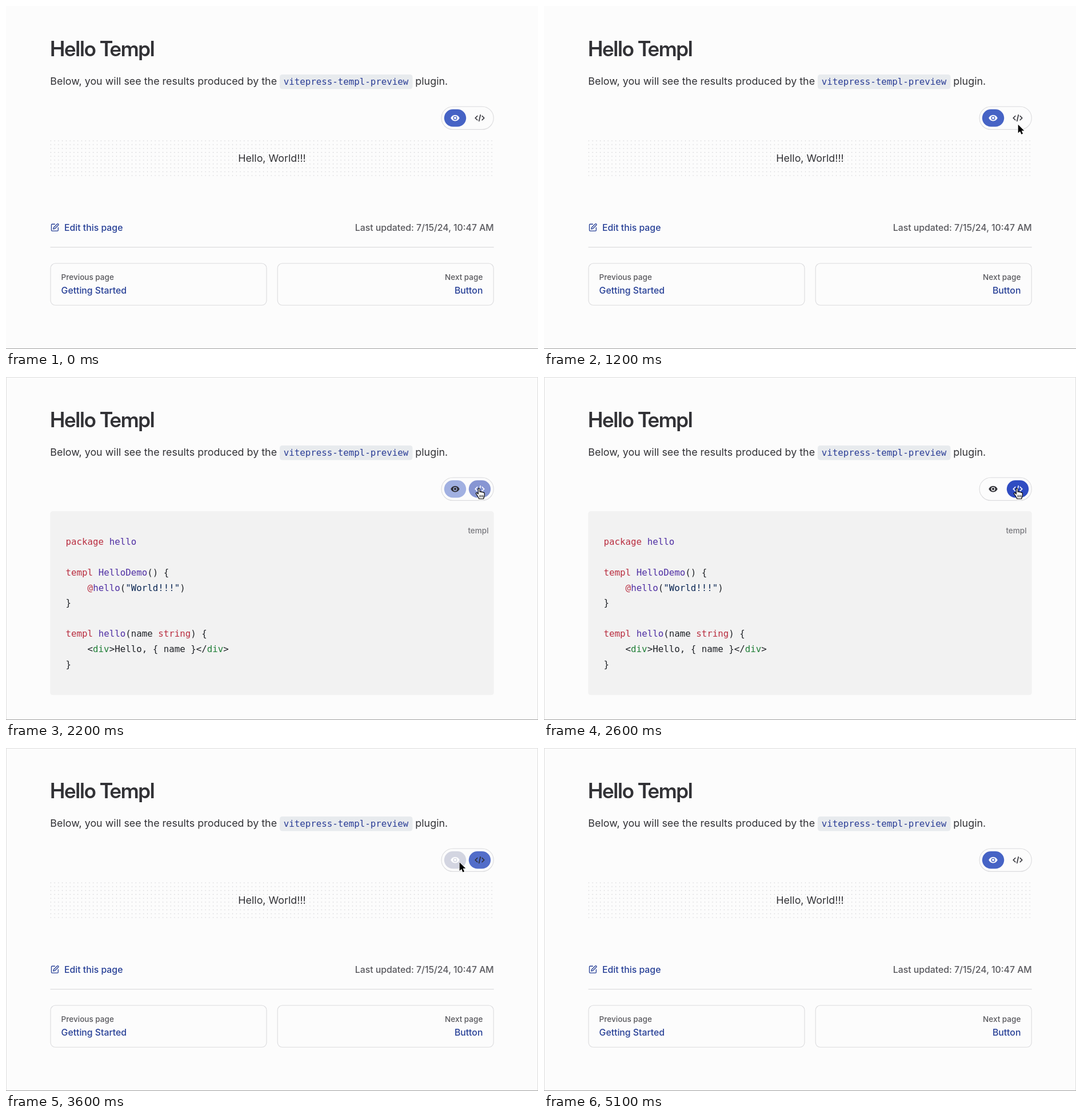
An HTML page for the animation above (5.2 s loop, 931x601 px).

```html
<!DOCTYPE html>
<html lang="en">
<head>
<meta charset="utf-8">
<title>Hello Templ</title>
<style>
  html, body { margin: 0; width: 100%; height: 100%; overflow: hidden; background: #fcfcfc; }
  svg { display: block; width: 931px; height: 601px; }
  text { font: 500 15.8px Inter, sans-serif; fill: #58585d; white-space: pre; }
  .title { font: 600 36.1px "Inter Display", Inter, sans-serif; letter-spacing: -.02em; fill: #323236; }
  .body { font-size: 17.9px; font-weight: 400; fill: #323236; }
  .small { font-size: 13.54px; }
  .link { fill: #263f96; }
  .mono { font: 15.79px "DejaVu Sans Mono", monospace; fill: #202328; }
  .mono.link { fill: #2a3d96; }
  .end { text-anchor: end; }
  .key { fill: #b92e40; }
  .fn { fill: #4f2fa3; }
  .str { fill: #0a2653; }
  .tag { fill: #217f38; }
  .outline { fill: none; stroke: #dcdcde; stroke-width: 1.13; }
</style>
</head>
<body>
<svg viewBox="0 0 931 601">
  <defs>
    <pattern id="dots" x="74.9" y="232.8" width="6.77" height="6.77" patternUnits="userSpaceOnUse">
      <circle cx="3.4" cy="3.4" r=".7" fill="#c6c6ca"/>
    </pattern>
  </defs>
  <rect width="931" height="601" fill="#fcfcfc"/>

  <text class="title" x="77.3" y="87.8">Hello Templ</text>
  <text class="body" x="77.3" y="138.3">Below, you will see the results produced by the</text>
  <rect x="479" y="120" width="232.5" height="25.5" rx="4.5" fill="#e8ebee"/>
  <text class="mono link" x="485.8" y="138">vitepress-templ-preview</text>
  <text class="body" x="716.3" y="138.3">plugin.</text>

  <rect class="outline" x="762" y="176.2" width="91.3" height="40.2" rx="20.1"/>
  <rect id="eyeButton" x="766.8" y="181" width="38.4" height="30.5" rx="15.25"/>
  <rect id="codeButton" x="809.8" y="181" width="38.4" height="30.5" rx="15.25"/>
  <path id="eyeIcon" transform="translate(777.6 187.8) scale(.7)" d="M12 4.5C7 4.5 2.73 7.61 1 12c1.73 4.39 6 7.5 11 7.5s9.27-3.11 11-7.5c-1.73-4.39-6-7.5-11-7.5zM12 17a5 5 0 1 1 0-10 5 5 0 0 1 0 10zm0-8a3 3 0 1 0 0 6 3 3 0 0 0 0-6z"/>
  <path id="codeIcon" d="M825.3 192.2l-4 4 4 4M832.7 192.2l4 4-4 4M830.4 190.2l-2.8 12" fill="none" stroke-width="1.6"/>

  <g id="preview">
    <rect x="77" y="234.5" width="776.5" height="63.5" fill="url(#dots)"/>
    <text class="body" x="465.5" y="272.8" text-anchor="middle">Hello, World!!!</text>
    <g transform="translate(77.5 380.3) scale(.658)" fill="none" stroke="#263f96" stroke-width="2" stroke-linecap="round" stroke-linejoin="round">
      <path d="M12 3H5a2 2 0 0 0-2 2v14a2 2 0 0 0 2 2h14a2 2 0 0 0 2-2v-7"/>
      <path d="M18.375 2.625a2.121 2.121 0 1 1 3 3L12 15l-4 1 1-4Z"/>
    </g>
    <text class="link" x="102" y="394.2">Edit this page</text>
    <text class="end" x="853.8" y="394.2">Last updated: 7/15/24, 10:47 AM</text>
    <path class="outline" d="M77.5 422.6H853.7"/>
    <rect class="outline" x="78" y="451" width="378" height="73.3" rx="8.5"/>
    <text class="small" x="96.6" y="480.3">Previous page</text>
    <text class="link" x="96.6" y="503.6">Getting Started</text>
    <rect class="outline" x="475.2" y="451" width="378" height="73.3" rx="8.5"/>
    <text class="small end" x="834.4" y="480.3">Next page</text>
    <text class="link end" x="834.4" y="503.6">Button</text>
  </g>

  <g id="code">
    <rect x="77.3" y="235.3" width="776.4" height="322" rx="4.5" fill="#f2f2f2"/>
    <text class="small end" x="844.6" y="273.6" style="fill:#77777c">templ</text>
    <g id="lines"></g>
  </g>

  <rect id="frame" x=".5" y=".5" width="930" height="600" fill="none" stroke="#dedede"/>
  <path d="M0 600.5H931" stroke="#a0a0a0"/>

  <g id="cursor">
    <path id="arrow" d="M0 0V14.8L3.4 11.6 5.7 17 8.3 15.9 6 10.6H10.6Z" stroke="#fff" stroke-width="1.3" paint-order="stroke"/>
    <g id="hand" stroke="#000" stroke-linejoin="round" stroke-linecap="round">
      <path fill="#fff" stroke-width="1.2" d="M-3.5 6C-4.5 4-7 1.5-7.3.2C-7.5-1.3-5.7-1.6-4.6-.4L-3.4 1V-7.4C-3.4-9.6-.6-9.6-.6-7.4V-2.4C-.4-3.8 2-3.8 2.2-2C2.6-3.2 4.8-3 5-1.2C5.6-2.2 7.6-1.8 7.6 0V3.5C7.6 6 6 7.5 6 9.5H-2C-2 8-2.6 7.2-3.5 6Z"/>
      <path d="M-.3 3v3.6M2.3 3v3.6M4.9 3v3.6"/>
    </g>
  </g>
</svg>

<script>
const $ = id => document.getElementById(id);

// Code to show; words are coloured by the rules below.
const source = `package hello

templ HelloDemo() {
    @hello("World!!!")
}

templ hello(name string) {
    <div>Hello, { name }</div>
}`;
const kinds = [
  ['key', /^(package|templ|string|@)$/],
  ['fn', /^(hello|HelloDemo)$/],
  ['str', /^"/],
  ['tag', /^div$/]
];
const escapeText = s => s.replace(/</g, '&lt;').replace(/>/g, '&gt;');
function colourWord(word) {
  const kind = kinds.find(([, rule]) => rule.test(word));
  return kind ? `<tspan class="${kind[0]}">${word}</tspan>` : escapeText(word);
}
$('lines').innerHTML = source.split('\n').map((line, i) =>
  `<text class="mono" x="104.6" y="${294.2 + i * 26.8}">` +
  line.split(/("[^"]*"|@|\w+)/).map(colourWord).join('') + '</text>').join('');

const ease = p => (p = Math.min(1, Math.max(0, p)), p * p * (3 - 2 * p));

// Eases a vector through each target in turn: [start, target, duration].
const follow = (from, moves, t) => moves.reduce((value, [start, target, duration = 250]) => {
  const p = ease((t - start) / duration);
  return value.map((v, i) => v + (target[i] - v) * p);
}, from);

const clear = [252, 252, 252], gray = [223, 223, 227];
const active = [70, 99, 197], hover = [47, 76, 194];

// The press starts the button fades; the panel swaps on the next step.
const openPress = 2075, closePress = 3560;
const eyeFades = [[openPress, clear], [2800, gray], [closePress, hover], [4150, active]];
const codeFades = [[1200, gray], [openPress, hover], [2750, active], [closePress, clear],
  [4250, gray], [4380, clear]];
const cursorEntry = [864, 236];
const cursorMoves = [[600, [829.7, 207.8], 500], [1200, [829.7, 204], 100],
  [2700, [793.7, 200.5], 400], [4100, [857, 204], 400]];

const show = (id, on) => $(id).style.display = on ? '' : 'none';
const fill = (id, colour) => $(id).setAttribute('fill', `rgb(${colour.map(Math.round)})`);

function draw(t) {
  const codeOpen = t > openPress && t < closePress;
  const pointing = t >= 1300 && t < 2900;
  show('code', codeOpen);
  show('preview', !codeOpen);
  show('frame', t >= 1300);
  fill('eyeButton', follow(active, eyeFades, t));
  fill('codeButton', follow(clear, codeFades, t));
  $('eyeIcon').setAttribute('fill', codeOpen ? '#303036' : '#fff');
  $('codeIcon').setAttribute('stroke', codeOpen ? '#fff' : '#303036');
  show('cursor', t >= 600 && t < 4600);
  show('hand', pointing);
  show('arrow', !pointing);
  $('cursor').setAttribute('transform', `translate(${follow(cursorEntry, cursorMoves, t)})`);
}

const start = performance.now();
function tick() {
  // The picture advances in steps of 100 ms; the panel swaps at 2200 and 3600.
  const step = Math.floor((performance.now() - start) % 5200 / 100) * 100;
  draw(step);
  requestAnimationFrame(tick);
}
tick();
</script>
</body>
</html>
```
